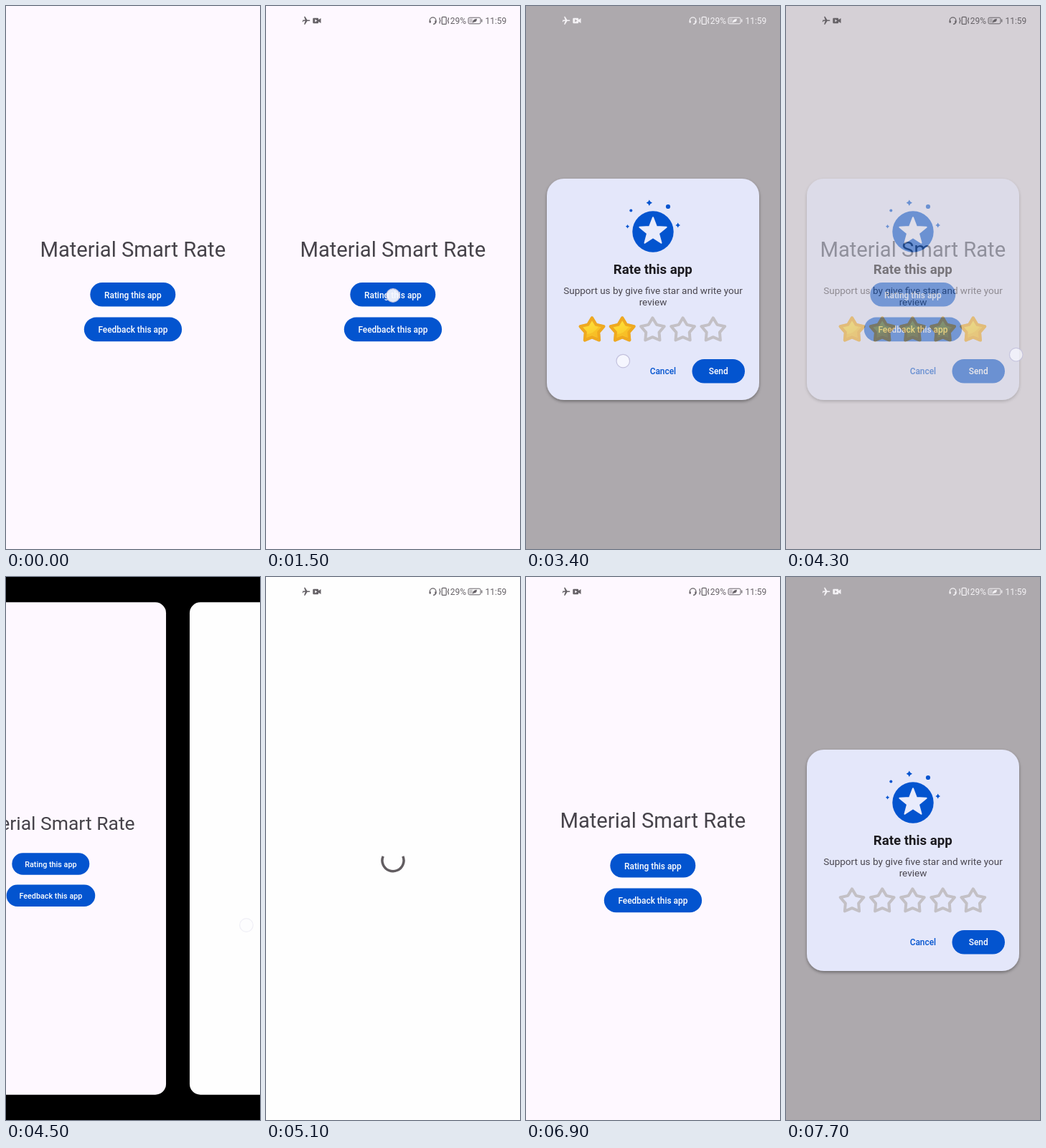
An HTML page that plays this animation: 354x758 px, repeating every 8 s.

```html
<!DOCTYPE html>
<html lang="en">
<head>
<meta charset="utf-8">
<title>Rating dialog</title>
<style>
  html, body { margin: 0; width: 100%; height: 100%; overflow: hidden; background: #000; }
  svg { display: block; width: 100vw; height: 100vh; font-family: Roboto, sans-serif; }
  .label { font-size: 11.9px; font-weight: 500; text-anchor: middle; }
  .mid { text-anchor: middle; }
</style>
</head>
<body>
<svg viewBox="0 0 354 758">
  <defs>
    <linearGradient id="gold" x1="0" y1="0" x2=".4" y2="1">
      <stop offset="0" stop-color="#ffe23a"/>
      <stop offset=".55" stop-color="#fccd1d"/>
      <stop offset="1" stop-color="#f6b81a"/>
    </linearGradient>
    <filter id="shadow" x="-10%" y="-10%" width="120%" height="120%">
      <feDropShadow dx="0" dy="2" stdDeviation="2.2" flood-color="#000" flood-opacity=".38"/>
    </filter>
  </defs>
  <rect width="354" height="758" fill="#000"/>

  <g id="home">
    <rect class="card" width="354" height="758" fill="#fef8ff"/>
    <text class="mid" x="176.8" y="350" font-size="29.2" fill="#46434a">Material Smart Rate</text>
    <g fill="#0354cf">
      <rect x="117.3" y="386" width="119" height="33.6" rx="16.8"/>
      <rect x="108.8" y="434.6" width="136.3" height="33.6" rx="16.8"/>
    </g>
    <g class="label" fill="#fff">
      <text x="176.9" y="407.8">Rating this app</text>
      <text x="176.9" y="456.3">Feedback this app</text>
    </g>
  </g>

  <g id="loader">
    <rect class="card" width="354" height="758" fill="#fefefe"/>
    <circle id="spinner" cx="177" cy="395.7" r="15" pathLength="360" fill="none" stroke="#625d61" stroke-width="3.5"/>
  </g>

  <rect id="dim" width="354" height="758" fill="#000"/>

  <g id="dialog">
    <rect x="29" y="241" width="296" height="309" rx="24" fill="#e4e7fa" filter="url(#shadow)"/>
    <g fill="#0354cf">
      <circle cx="177" cy="315" r="28.7"/>
      <circle cx="146.3" cy="285.5" r="2"/>
      <circle cx="198" cy="280" r="3.1"/>
      <path id="sparkles"/>
      <rect x="231.5" y="493" width="73.5" height="33.6" rx="16.8"/>
    </g>
    <path id="badge" fill="#e9ecfc" stroke="#e9ecfc" stroke-width="2" stroke-linejoin="round"/>
    <text class="mid" x="176.8" y="373.5" font-size="18.7" font-weight="700" fill="#1c1b20">Rate this app</text>
    <g class="mid" font-size="13.5" fill="#49464f">
      <text x="177" y="402">Support us by give five star and write your</text>
      <text x="177" y="417.5">review</text>
    </g>
    <g id="stars"></g>
    <g class="label">
      <text x="190.9" y="514.3" fill="#0354cf">Cancel</text>
      <text x="268.2" y="514.3" fill="#fff">Send</text>
    </g>
  </g>

  <g id="status">
    <path d="M51 19.6h3.6l-1.6-4.8h1.5l3 4.8h3.2q1.6 .7 0 1.4h-3.2l-3 4.8h-1.5l1.6-4.8h-2.2l-.9 1.2h-.9l.7-1.9z"/>
    <path d="M66.5 16.7h5.5q1.2 0 1.2 1.2v1.4l3.3-2.3v7l-3.3-2.3v1.4q0 1.2-1.2 1.2h-5.5q-1.2 0-1.2-1.2v-5.2q0-1.2 1.2-1.2zM68.3 18.5v4l3-2z" fill-rule="evenodd"/>
    <g id="outlines" fill="none" stroke-width="1.2">
      <path d="M228.3 22.5v-2.3a4.3 4.3 0 0 1 8.6 0v2.3M236.6 23q-.5 2.1-3.6 2.3"/>
      <path d="M228.7 20.6v3M236.4 20.6v3" stroke-width="2.2"/>
      <rect x="245.2" y="15.4" width="6" height="10" rx="1"/>
      <path d="M242 16.2v2.2l.9 2-.9 2v2.2M254.3 16.2v2.2l-.9 2 .9 2v2.2"/>
      <rect x="282" y="16.2" width="17" height="8.6" rx="1.8" stroke-width="1"/>
      <path d="M300.8 18.6v3.8"/>
    </g>
    <rect x="283.4" y="17.6" width="4.4" height="5.8" opacity=".35"/>
    <path d="M287.8 23.2q.6-5.2 6-5.4q.3 5.2-4.4 4.6l-.7 1z"/>
    <text x="256.8" y="24.7" font-size="12">29%</text>
    <text x="305.4" y="24.7" font-size="12">11:59</text>
  </g>

  <circle id="touch" r="9.3" fill="#f6f7fe" fill-opacity=".92" stroke="#c3c1dd" stroke-width="1.2"/>
</svg>
<script>
const LOOP = 8000, STEP = 100, W = 354;
const OPENINGS = [1500, 7300], DRAG = 2400, TURN = 3250, SEND = 4200;
const SPIN = 5000, BACK = 6400, SLIDE = 500;
const $ = id => document.getElementById(id);
const starX = [0, 1, 2, 3, 4].map(i => 92 + 42.2 * i);

function starPath(cx, cy, outer, inner) {
  let d = '';
  for (let i = 0; i < 10; i++) {
    const r = i % 2 ? inner : outer, a = (i / 5 - 0.5) * Math.PI;
    d += (i ? 'L' : 'M') + (cx + r * Math.cos(a)).toFixed(2) + ' ' + (cy + r * Math.sin(a)).toFixed(2);
  }
  return d + 'Z';
}

function sparkle(x, y, r) {
  const k = r * 0.22;
  return `M${x} ${y - r}Q${x + k} ${y - k} ${x + r} ${y}Q${x + k} ${y + k} ${x} ${y + r}` +
    `Q${x - k} ${y + k} ${x - r} ${y}Q${x - k} ${y - k} ${x} ${y - r}Z`;
}

// Eased 0 to 1 between two times.
function ease(from, to, t) {
  const u = Math.min(1, Math.max(0, (t - from) / (to - from)));
  return u * u * (3 - 2 * u);
}

const show = (id, opacity) => $(id).setAttribute('opacity', opacity);

$('badge').setAttribute('d', starPath(177, 314.8, 19.6, 8.4));
$('sparkles').setAttribute('d', sparkle(171.8, 274.8, 4.2) + sparkle(211.7, 306, 3.4) + sparkle(141.5, 307.7, 2.7));
$('stars').innerHTML = starX.map(x => {
  const body = starPath(x, 452.6, 17.2, 9.6);
  return `<path d="${body}" fill="none" stroke="#c3c0c5" stroke-width="4" stroke-linejoin="round"/>
    <g class="gold"><path d="${body}" fill="url(#gold)" stroke="#efa91f" stroke-width="4.2" stroke-linejoin="round"/>
    <path d="${starPath(x, 452.4, 13.5, 7.6)}" fill="#fff06a" opacity=".25"/>
    <path d="M${x - 9} 458q10 1 18-10l4 1-5 6 2 9-10-5-9 5z" fill="#f4ac18" opacity=".4"/></g>`;
}).join('');
const golds = [...document.querySelectorAll('.gold')];
const cards = [...document.querySelectorAll('.card')];

// Both pages shrink to cards, slide one page width, then grow back.
function drawPages(t) {
  const page = ease(SEND + 110, SEND + 110 + SLIDE, t) - ease(BACK, BACK + SLIDE, t);
  const squeeze = Math.min(1, 4.8 * page * (1 - page));
  const scale = 1 - 0.093 * squeeze;
  ['home', 'loader'].forEach((id, i) => $(id).setAttribute('transform',
    `translate(${W / 2 + W * (i - page)} 379) scale(${scale}) translate(${-W / 2} -379)`));
  cards.forEach(c => c.setAttribute('rx', 16.5 * squeeze));
  show('status', squeeze > 0.02 ? 0 : Math.min(1, t / 200));
}

function drawSpinner(t) {
  const age = (t - SPIN - 100) / 1000;
  const sweep = 226 + 40 * Math.sin(age * 5);
  $('spinner').setAttribute('stroke-dasharray', `${sweep} ${360 - sweep}`);
  $('spinner').setAttribute('transform', `rotate(${age * 520 - 23} 177 395.7)`);
  show('spinner', t >= SPIN ? 1 : 0);
}

function drawDialog(t) {
  const [first, second] = OPENINGS;
  const open = ease(first, first + 300, t) - ease(SEND, SEND + 200, t) + ease(second, second + 300, t);
  show('dim', 0.32 * open);
  show('dialog', open);
  const tint = open > 0.5 ? '#f4f2f5' : '#666267';
  $('status').setAttribute('fill', tint);
  $('outlines').setAttribute('stroke', tint);
}

// The finger sweeps left over the stars, turns, and sweeps off to the right.
function drawDrag(t) {
  const dragging = t >= DRAG && t <= SEND + 300;
  const x = 268 - 141 * ease(DRAG, TURN, t) + 208 * ease(TURN, SEND + 300, t);
  const y = 455 + 41 * ease(DRAG, TURN, t) - 10 * ease(TURN, SEND + 300, t);
  golds.forEach((g, i) => g.setAttribute('opacity', dragging && x > starX[i] - 20 ? 1 : 0));

  const tapping = OPENINGS.includes(t);
  $('touch').setAttribute('cx', tapping ? 177 : x);
  $('touch').setAttribute('cy', tapping ? 404 : y);
  show('touch', tapping ? 1 : dragging ? 1 - 0.75 * ease(SEND, SEND + 300, t) : 0);
}

function draw(t) {
  drawPages(t);
  drawSpinner(t);
  drawDialog(t);
  drawDrag(t);
}

const began = performance.now();
function tick() {
  const t = Math.max(0, performance.now() - began) % LOOP;
  draw(Math.floor(t / STEP) * STEP);
  requestAnimationFrame(tick);
}
tick();
</script>
</body>
</html>
```
